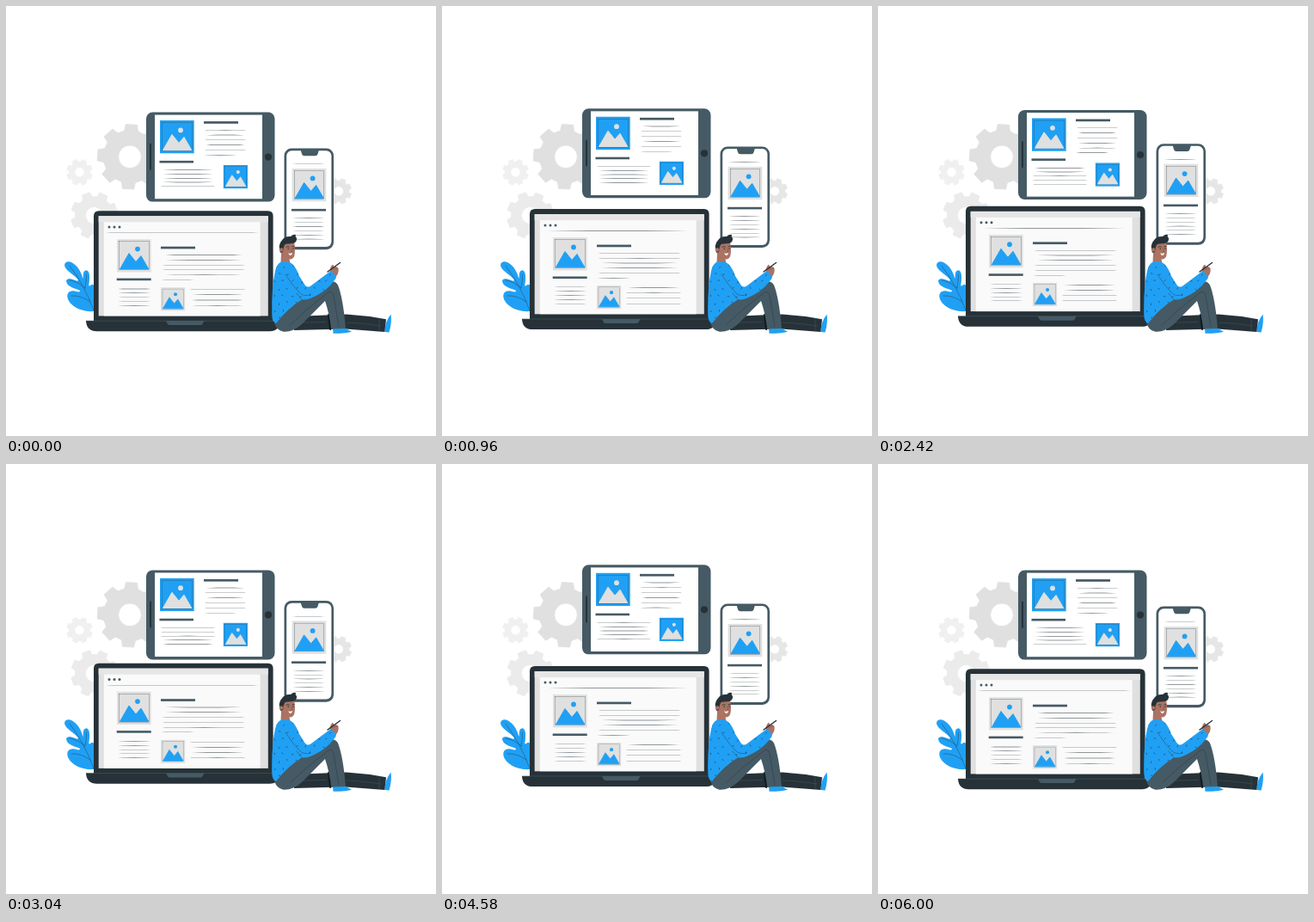
Recreate the animation shown at these times as an HTML page. Size 500 by 500 pixels, loop 6.04 s.

```html
<!DOCTYPE html>
<html lang="en">
<head>
<meta charset="utf-8">
<title>Responsive layouts</title>
<style>
html, body { margin: 0; width: 100%; height: 100%; overflow: hidden; background: #fff; }
svg { display: block; width: 100vw; height: 100vh; }
</style>
</head>
<body>
<svg id="stage" viewBox="0 0 500 500"></svg>
<script>
const BLUE = '#20a0f4', SLATE = '#455a64', DARK = '#263238', PALE = '#e0e0e0', SKIN = '#aa7363';
const LOOP = 6040, CYCLE = 6000, RISE = 6.6;

const path = (d, fill) => `<path d="${d}" fill="${fill}"/>`;
const stroke = (d, color, width = 0.5) =>
  `<path d="${d}" fill="none" stroke="${color}" stroke-width="${width}" stroke-linecap="round"/>`;
const box = (x1, y1, x2, y2, fill, r = 0) =>
  `<rect x="${x1}" y="${y1}" width="${x2 - x1}" height="${y2 - y1}" rx="${r}" fill="${fill}"/>`;
const dot = (x, y, r, fill) => `<circle cx="${x}" cy="${y}" r="${r}" fill="${fill}"/>`;

// Hairlines taper towards both ends
const line = (x1, x2, y) =>
  `<ellipse cx="${(x1 + x2) / 2}" cy="${y}" rx="${(x2 - x1) / 2}" ry=".19" fill="${DARK}"/>`;
const lines = (x1, x2, y, step, count) =>
  Array.from({ length: count }, (_, i) => line(x1, x2, y + i * step)).join('');

function gear(cx, cy, outer, hole, turn, fill) {
  const inner = outer * 0.81, points = [];
  for (let i = 0; i < 8; i++) {
    for (const [offset, r] of [[-15, inner], [-10, outer], [10, outer], [15, inner]]) {
      const a = (turn + i * 45 + offset) * Math.PI / 180;
      points.push(`${(cx + r * Math.cos(a)).toFixed(2)} ${(cy + r * Math.sin(a)).toFixed(2)}`);
    }
  }
  const ring = `M${cx - hole} ${cy}a${hole} ${hole} 0 1 0 ${2 * hole} 0a${hole} ${hole} 0 1 0 ${-2 * hole} 0Z`;
  return `<path d="M${points.join('L')}Z${ring}" fill="${fill}" fill-rule="evenodd" stroke="${fill}" stroke-width=".8" stroke-linejoin="round"/>`;
}

function picture(x, y, scale, back, front) {
  return `<g transform="translate(${x} ${y}) scale(${scale})">
    ${box(0, 0, 39.7, 38.3, back)}
    <rect x="2.8" y="2.6" width="34.4" height="32.8" fill="none" stroke="${DARK}" stroke-width=".28"/>
    <path d="M3.5 34.7L14 16.4L22 26.4L28 19.4L36.8 34.7Z" fill="${front}" stroke="${front}" stroke-linejoin="round"/>
    ${dot(24, 11.4, 2.9, front)}</g>`;
}

const gears = gear(144, 175.3, 38, 13.3, -87, PALE) + gear(102.5, 243.5, 27.3, 10, -66, '#ebebeb') +
  gear(85.5, 193.3, 15.2, 5.6, -68, '#f0f0f0') + gear(386.8, 215.3, 15, 5.6, -68, '#e6e6e6');

const tablet =
  box(163, 123.6, 312.5, 227.6, SLATE, 7.5) +
  box(173, 126.6, 298, 224.2, '#fff') +
  box(167, 159.8, 169, 190.8, DARK, 1) +
  dot(305, 175.6, 4.1, DARK) +
  picture(179, 133, 1, BLUE, PALE) +
  box(178.5, 179.9, 218, 182.5, SLATE) +
  box(230, 134.1, 270, 136.8, SLATE) +
  lines(231, 279, 144.2, 5.85, 5) + line(230, 268.5, 173.3) +
  lines(179.5, 243.5, 190.8, 4.72, 5) +
  picture(252.8, 185, 0.71, BLUE, PALE);

const phone =
  box(323.5, 165.6, 381, 283.2, SLATE, 8.5) +
  box(326.2, 168.2, 378.4, 280, '#fff', 6) +
  path('M342.5 167H364L362.5 172Q362 174.3 359.5 174.3H347Q344.5 174.3 344 172Z', SLATE) +
  line(332.5, 371, 183.6) +
  picture(332.6, 189, 1, PALE, BLUE) +
  box(332, 235.9, 372, 238.5, SLATE) +
  lines(333, 371, 246.8, 4.85, 6);

const laptop =
  path('M102 367V244.2Q102 238.2 108 238.2H304.6Q310.6 238.2 310.6 244.2V367Z', DARK) +
  box(107.7, 244.2, 304.8, 360.4, PALE) +
  box(107.7, 244.2, 304.8, 251.2, '#e6e6e6') +
  box(113.8, 251.2, 295.6, 360.4, '#fafafa') +
  [120, 126, 132].map(x => dot(x, 257, 1.5, SLATE)).join('') +
  line(115.5, 293.5, 263.6) +
  picture(129, 271.2, 1, PALE, BLUE) +
  box(128.7, 316.6, 168.7, 319.2, SLATE) +
  lines(130, 168.5, 329, 4.8, 5) +
  box(180, 279.7, 220, 282.4, SLATE) +
  lines(181.5, 278, 289.5, 5.8, 5) + line(180, 219, 318.4) +
  picture(180, 327.2, 0.71, PALE, BLUE) +
  lines(213.5, 278.5, 329.6, 6.2, 4) +
  path('M93 366H318.5V366.5Q318 378.2 306.5 378.2H105.5Q94 378.2 93 366.5Z', DARK) +
  box(93, 365.8, 318.5, 366.4, SLATE) +
  path('M186 366H230.5L228.7 369.6Q228 371 226.5 371H190Q188.5 371 187.8 369.6Z', SLATE);

const leaf =
  path(`M103 355C91 356 78 352 72.5 342C69 334 74 330 80 331.5C84 332.5 86 333 86 331
    C82 328.5 72 327.5 70.3 321C69 316.5 75 316.5 80 318.8C83 320 84.5 320 84 318.5
    C80 313 71 309 68.4 303C67 298 72 296 76.5 298.2C84 302 88 311 89.3 317
    C90.5 314 88.5 307.5 93.5 307.2C98 308 97.5 317 96.3 325C97 326.5 98 324.5 99.5 324
    C103 322.5 104 330 103.5 337Z`, BLUE) +
  stroke('M74 302Q91 324 102 354M98 344Q87 336 76 337M92 328Q83 320 74 319M92 328Q94 318 93.5 312', DARK, 0.4);

const sweater = `M319 298Q328 295.5 333 300Q338 305 341 314L348 325Q351 328 355 325L377 308.5
  Q382 310 384 316Q374 332 354 340Q349 342 344 341.5Q328 351 314 369Q309.5 367 309.3 360
  Q308.5 328 313 308Q315 300 319 298Z`;

// Short dashes scattered over a loose grid
function dashes() {
  let d = '';
  for (let row = 0; row < 8; row++) {
    for (let col = 0; col < 8; col++) {
      const i = row * 8 + col, a = i * 2.4;
      const x = 313 + col * 10 + (row % 2) * 5 + Math.sin(i * 7), y = 303 + row * 8.5 + Math.cos(i * 5);
      d += `M${x.toFixed(1)} ${y.toFixed(1)}l${(1.6 * Math.cos(a)).toFixed(1)} ${(1.6 * Math.sin(a)).toFixed(1)}`;
    }
  }
  return stroke(d, DARK, 0.6);
}

const man =
  // far leg and shoe
  path('M334 361L396 358.5Q420 360 442 364.2L440.5 379L395 375.5L335 377Z', DARK) +
  stroke('M396 368Q418 369 436 372M345 368L372 367.5M434 364V378', SLATE, 0.5) +
  stroke('M375 359L377 376', '#111a1f', 2) +
  path('M440.5 379Q440 368 447.5 358.5Q449 367 445.5 379.5Z', BLUE) +
  // near leg and shoe
  path('M380 375H395Q398 377 402 378.4Q397 380.8 380.5 380.8Z', BLUE) +
  path(`M311 362Q312 377 323 378.7Q334 379 344 370L371 343Q376 358 378.3 375.5L395 375
    Q392 340 386 324.5Q381 317 372 323L340 343Z`, SLATE) +
  stroke('M330 371Q352 350 375 333Q380 331 381 337L387 373', DARK, 0.4) +
  // head
  path('M320.5 276L335 274Q336.8 284 335.3 290.5Q333.5 295 329.5 294.4L330.5 299Q325 300.5 319.5 298Z', SKIN) +
  path('M319 287Q316 277 320.5 273Q324 267.3 331 268Q334 265 337 266Q335.8 268 338 270Q338.5 275 333.5 276Q327 276.3 324.5 277Q322.5 280 322 286Z', DARK) +
  dot(320, 283.5, 2.2, SKIN) +
  stroke('M326 280.2Q327.5 279 329.2 280M333 279.8L335 279.5', DARK, 0.8) +
  dot(328.2, 282.3, 0.7, DARK) + dot(334, 282, 0.7, DARK) +
  path('M327.8 287.3Q331 288.5 333 287Q332.5 290.5 330 290Z', '#fff') +
  stroke('M331.5 282L333 285.4H331.5', '#7d4b40', 0.5) +
  // hand and pen
  path('M376.5 309Q376.5 303 380 300.5L381.3 303Q386.5 302.5 386.6 306.5Q387 311 383.2 315.5Z', SKIN) +
  stroke('M374 309L388.5 298.5', DARK, 1.4) +
  stroke('M380 306.5Q383 304 386 305', '#7d4b40', 0.5) +
  // sweater
  path(sweater, BLUE) +
  `<clipPath id="knit"><path d="${sweater}"/></clipPath><g clip-path="url(#knit)">${dashes()}</g>` +
  stroke('M325 312Q333 325 342 334Q347 338 354 336M344 341.5L338 334', DARK, 0.4);

document.getElementById('stage').innerHTML =
  `${gears}<g id="tablet">${tablet}</g>${leaf}<g id="phone">${phone}</g><g id="laptop">${laptop}</g>${man}`;

// Straight rise to the middle of the period, then straight back down
const lift = (time, period) => -RISE * (1 - Math.abs(1 - 2 * (time % period) / period));
const shift = (id, y) => document.getElementById(id).setAttribute('transform', `translate(0 ${y.toFixed(3)})`);

function draw() {
  const time = performance.now() % LOOP;
  shift('tablet', lift(time, CYCLE / 2));
  shift('phone', lift(time, CYCLE));
  shift('laptop', lift(time, CYCLE));
  requestAnimationFrame(draw);
}
draw();
</script>
</body>
</html>
```
